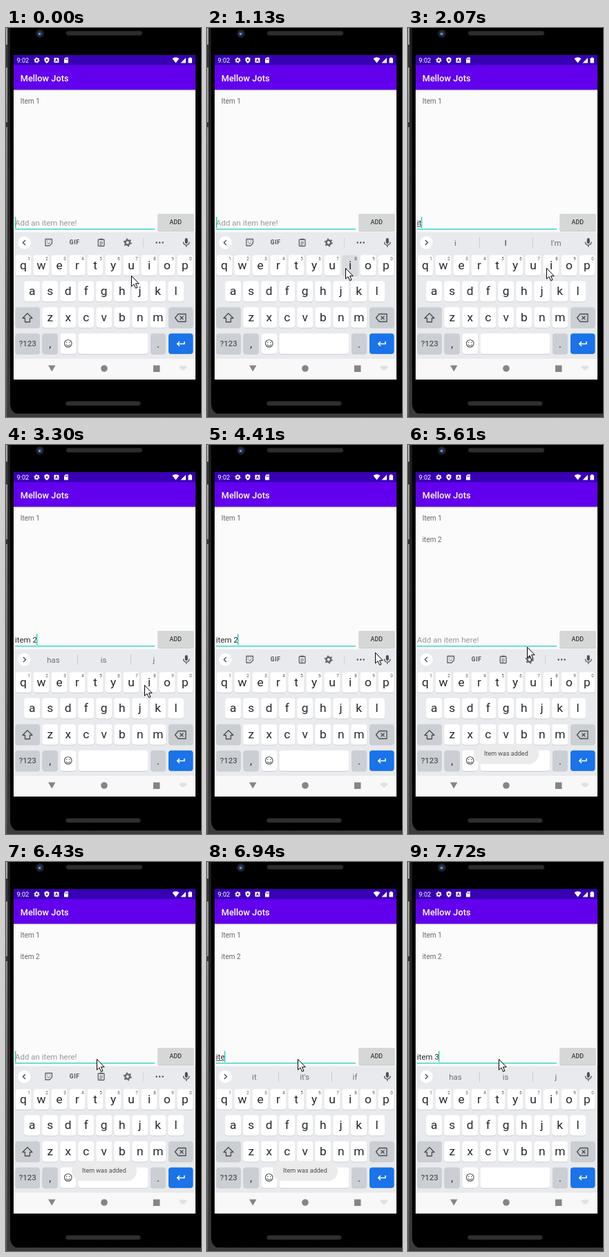
These frames come from a looping animation (282x561 px, 8 s). An HTML page:

```html
<!DOCTYPE html>
<html lang="en">
<head>
<meta charset="utf-8">
<title>Mellow Jots</title>
<style>
html, body { margin: 0; width: 100%; height: 100%; overflow: hidden; background: #000; }
svg { display: block; position: absolute; left: 0; top: 0; }
text { font-family: Roboto, "Noto Sans", sans-serif; white-space: pre; }
</style>
</head>
<body>
<svg id="stage" width="282" height="561" viewBox="0 0 282 561">
  <defs>
    <linearGradient id="wall" x2="0" y2="1">
      <stop offset="0" stop-color="#a8a8a8"/><stop offset=".26" stop-color="#8c8c8c"/><stop offset="1" stop-color="#505050"/>
    </linearGradient>
    <linearGradient id="rim" x2="0" y2="1">
      <stop offset="0" stop-color="#1c1c1c"/><stop offset="1" stop-color="#3c3c3c"/>
    </linearGradient>
  </defs>
  <rect width="282" height="561" fill="#000"/>
  <rect width="2.500" height="561" fill="url(#wall)"/>
  <path d="M2.500 0H6V543Q7 553 14 556H282V561H2.500Z" fill="url(#rim)"/>
  <path d="M0 24H2.500V57H0ZM0 136H2.500V143H0Z" fill="#333"/>
  <rect x="87" y="4.500" width="110" height="6" rx="3" fill="#2c2c2c" stroke="#1c1c1c"/>
  <rect x="86.500" y="538.500" width="108" height="6" rx="3" fill="#2f2f2f" stroke="#1e1e1e"/>
  <circle cx="49" cy="8" r="6" fill="#1b1f25"/>
  <circle cx="49" cy="8" r="3.400" fill="#26375f"/>
  <circle cx="48.500" cy="8.500" r="1.600" fill="#7e9bd2"/>

  <rect x="11" y="39" width="263" height="468" fill="#fbfbfb"/>
  <rect x="11" y="39" width="263" height="15" fill="#3700b3"/>
  <rect x="11" y="53.500" width="263" height="35.500" fill="#6200ee"/>
  <rect x="11" y="89" width="263" height="1" fill="#c9c4d2"/>
  <rect x="11" y="90" width="263" height="1" fill="#e9e8eb"/>
  <text x="15.500" y="50" font-size="9.200" fill="#fff">9:02</text>
  <g fill="#fff">
    <circle cx="44.500" cy="46.500" r="2.300" fill="none" stroke="#fff" stroke-width="1.700"/>
    <circle cx="44.500" cy="46.500" r="3.600" fill="none" stroke="#fff" stroke-width="1.200" stroke-dasharray="1.600 2.170"/>
    <path d="M59 42L62.500 43.500V46.500Q62 49.500 59 51Q56 49.500 55.500 46.500V43.500Z"/>
    <circle cx="59" cy="46.500" r="1.300" fill="#3700b3"/>
    <rect x="69.500" y="43" width="7" height="7" rx=".8"/>
    <path d="M71.300 48.700L73 44.500L74.700 48.700M72 47.300H74" stroke="#3700b3" stroke-width=".9" fill="none"/>
    <path d="M86 42.500H90V50.500H84V44.500Z"/>
    <path d="M85.800 44V46M87.300 44V46M88.800 44V46" stroke="#3700b3" stroke-width=".7"/>
    <path d="M240.500 44Q245.500 40.500 250.500 44L245.500 50.500Z"/>
    <path d="M252.500 50.500L260 43V50.500Z"/>
    <path d="M263.500 43.500H265V42.500H267.500V43.500H269V50.500H263.500Z"/>
  </g>
  <text x="20.700" y="77" font-size="12.800" font-weight="500" fill="#fff">Mellow Jots</text>
  <g font-size="10" fill="#686868">
    <text x="20.700" y="109">Item 1</text>
    <text id="added" x="20.700" y="139.500">item 2</text>
  </g>

  <text id="field" x="12.900" y="285" font-size="11.500"></text>
  <rect id="under" x="13" y="286.200" height=".8" fill="#333"/>
  <rect id="caret" y="272.500" width="1.500" height="16" fill="#2fd3c4"/>
  <rect x="13" y="289.500" width="202" height="1.300" fill="#25d0c2"/>
  <rect x="219.500" y="268.500" width="52" height="25" rx="1" fill="#c5c5c5"/>
  <rect id="add" x="219.500" y="268" width="51.500" height="24.500" rx="1" fill="#d6d7d7"/>
  <text x="245.300" y="283.300" font-size="8.900" font-weight="500" text-anchor="middle" fill="#3a3a3a">ADD</text>

  <rect x="11" y="294.500" width="263" height="183" fill="#e8eaed"/>
  <g id="keys"></g>
  <g fill="none" stroke="#4a4d51" stroke-width="1.300">
    <path d="M31 411.500L38 418.500H34.500V424H27.500V418.500H24Z" stroke-linejoin="round"/>
    <path d="M249 412.500H260V423.500H249L244.500 418Z" stroke-linejoin="round"/>
    <path d="M251.500 415.500L256.500 420.500M256.500 415.500L251.500 420.500"/>
    <circle cx="89.800" cy="455" r="5.300" stroke-width="1.100"/>
    <path d="M86.800 456.500Q89.800 460 92.800 456.500" stroke-width="1.100"/>
    <path d="M87.800 453V454.300M91.800 453V454.300"/>
    <path d="M258 452V455.500H248M251 452.300L247.700 455.500L251 458.700" stroke="#fff" stroke-width="1.500"/>
  </g>

  <circle cx="26.500" cy="309.500" r="9.300" fill="#fff"/>
  <path id="chevron" fill="none" stroke="#4a4d51" stroke-width="1.400"/>
  <g fill="#4a4d50">
    <rect x="258.800" y="303" width="4" height="8" rx="2"/>
    <path d="M256.500 308.500Q256.500 313 260.800 313Q265 313 265 308.500M260.800 313V316" fill="none" stroke="#4a4d50" stroke-width="1.200"/>
  </g>
  <g id="tools" fill="none" stroke="#5f6368" stroke-width="1.300">
    <path d="M57 304.500H66.500V310.500L63 314H57Z" stroke-linejoin="round"/>
    <path d="M59.500 309.500Q61.500 312.500 64 309.500M59.800 306.500V307.700M63.700 306.500V307.700" stroke-width="1"/>
    <text x="99.200" y="312.300" font-size="8.500" font-weight="700" text-anchor="middle" fill="#4f5357" stroke="none" letter-spacing=".6">GIF</text>
    <rect x="133.300" y="305" width="8.700" height="9.500" rx=".8"/>
    <path d="M135.500 304.800H140" stroke-width="2.200"/>
    <path d="M135.300 308.700H140M135.300 310.700H140M135.300 312.700H138.500" stroke-width=".9"/>
    <circle cx="175.800" cy="309.500" r="3.300" stroke-width="2.300"/>
    <circle cx="175.800" cy="309.500" r="5.200" stroke-width="1.600" stroke-dasharray="2.300 3.145"/>
    <path d="M198.500 303V316" stroke="#d0d3d6" stroke-width="1"/>
    <path d="M217.700 309.500H228" stroke="#4a4d50" stroke-width="2.400" stroke-linecap="round" stroke-dasharray="0 4.500"/>
  </g>
  <g id="words" font-size="11.500" text-anchor="middle" fill="#6c7075">
    <path d="M103.500 302V317M180.500 302V317" stroke="#c9ccd0"/>
    <text x="68.400" y="313.500"></text><text x="141.200" y="313.500"></text><text x="214" y="313.500"></text>
  </g>

  <g id="toast">
    <rect x="95" y="431" width="94" height="29" rx="14.500" fill="#ebebeb"/>
    <text x="110" y="448.300" font-size="9" fill="#4c4c4c">Item was added</text>
  </g>

  <rect x="11" y="477" width="263" height="30" fill="#f8f8f8"/>
  <g fill="#858585">
    <path d="M61 486.500H71.500L66.300 495.500Z"/>
    <circle cx="142" cy="491" r="4.800"/>
    <rect x="213" y="486.500" width="9.500" height="9.500"/>
    <path d="M251 488H261M251 490.200H261M253.500 492.400H258.500" stroke="#cfcfcf" stroke-width="1.200"/>
  </g>
  <path id="mouse" d="M.5 .5V15.800L4 12.600L6.600 18.300L9 17.200L6.500 11.700H11.200Z" fill="#fff" stroke="#000" stroke-width="1"/>
</svg>
<script>
const LOOP = 8000;
const $ = id => document.getElementById(id);
const NS = "http://www.w3.org/2000/svg";

function make(tag, parent, attrs, label) {
  const el = document.createElementNS(NS, tag);
  for (const k in attrs) el.setAttribute(k, attrs[k]);
  if (label) el.textContent = label;
  parent.append(el);
  return el;
}

function key(x, y, w, fill = "#fff", label = "", size = 17.4, extra = {}) {
  make("rect", $("keys"), { x, y: y + 1, width: w, height: 29.5, rx: 4, fill: "#cdd0d4" });
  const cap = make("rect", $("keys"), { x, y, width: w, height: 29.5, rx: 4, fill });
  make("text", $("keys"), {
    x: x + w / 2, y: y + 20, "font-size": size, "text-anchor": "middle", fill: "#25282b", ...extra
  }, label);
  return cap;
}

const GREY = "#cbced3", PITCH = 26;
const caps = {};
[["qwertyuiop", 13.5, 327.5], ["asdfghjkl", 26.2, 365], ["zxcvbnm", 52.3, 402.7]].forEach(([row, x0, y], r) => {
  [...row].forEach((c, i) => {
    const x = x0 + i * PITCH;
    caps[c] = key(x, y, 23, "#fff", c);
    if (r === 0) make("text", $("keys"), {
      x: x + 19.5, y: y + 7.7, "font-size": 6.4, "text-anchor": "middle", fill: "#55585c"
    }, String((i + 1) % 10));
  });
});
key(13.5, 402.7, 35.5, GREY);
key(235, 402.7, 35.5, GREY);
key(13.5, 440.5, 35.5, GREY, "?123", 11.5, { y: 459.3, "font-weight": 500, fill: "#55585d" });
key(52.5, 440.5, 22.5, GREY, ",", 15);
key(78.5, 440.5, 23);
key(104.5, 440.5, 101);
key(209, 440.5, 22, GREY, ".", 15);
key(235, 440.5, 35.5, "#1a73e8");

// Each row: time, then the state it changes.
const I = ["i", "I", "I'm"], IT = ["it", "it's", "if"],
  ITE = ["item", "items", "it"], ITEM = ["item", "items", "item's"], NEXT = ["has", "is", "j"];
const steps = [
  [0, { text: "", mark: 0, caret: 1, words: null, added: 0, toast: 0, press: 0, hit: 0, x: 181, y: 357 }],
  [150, { x: 184, y: 355 }],
  [290, { x: 193, y: 350 }],
  [430, { x: 199, y: 347 }],
  [570, { x: 200, y: 346, caret: 0 }],
  [1130, { hit: 1, caret: 1 }],
  [1280, { hit: 0, text: "i", mark: 1, words: I }],
  [1680, { caret: 0 }],
  [2070, { text: "it", caret: 1 }],
  [2330, { words: IT }],
  [2450, { text: "ite" }],
  [2760, { text: "item", words: ITE }],
  [3010, { words: ITEM }],
  [3300, { text: "item 2", mark: 0, words: NEXT }],
  [3720, { x: 206, y: 334 }],
  [3840, { x: 229, y: 288, caret: 0 }],
  [3960, { x: 258, y: 232, words: null }],
  [4080, { x: 270, y: 205 }],
  [4240, { x: 262, y: 255 }],
  [4410, { x: 243, y: 299, caret: 1 }],
  [4530, { x: 243, y: 287 }],
  [4680, { x: 243, y: 280 }],
  [4810, { press: 1 }],
  [4930, { text: "", added: 1, toast: .6 }],
  [5060, { press: 0, toast: 1 }],
  [5220, { caret: 0 }],
  [5350, { x: 235, y: 282 }],
  [5490, { x: 206, y: 288 }],
  [5610, { x: 172, y: 291 }],
  [5730, { x: 144, y: 289, caret: 1 }],
  [5880, { x: 134, y: 285 }],
  [6030, { x: 131, y: 284, caret: 0 }],
  [6430, { caret: 1 }],
  [6700, { text: "i", mark: 1 }],
  [6820, { text: "it", words: I }],
  [6940, { text: "ite", words: IT }],
  [7180, { text: "item", words: ITE }],
  [7300, { words: ITEM }],
  [7420, { text: "item ", mark: 0, toast: .5 }],
  [7580, { words: NEXT, toast: 0 }],
  [7720, { text: "item 3" }]
];

const show = (el, v) => el.setAttribute("opacity", +v);
const slots = $("words").querySelectorAll("text");

// Glyph advances at the field's font size.
const advance = { i: 2.8, t: 3.75, e: 6.1, m: 10.1, " ": 2.85 };
const widthOf = s => [...s].reduce((w, c) => w + (advance[c] || 6.45), 0);

function draw(t) {
  const s = {};
  for (const [at, change] of steps) if (at <= t) Object.assign(s, change);
  const field = $("field"), w = widthOf(s.text);
  field.textContent = s.text || "Add an item here!";
  field.setAttribute("fill", s.text ? "#2c2c2c" : "#999");
  $("under").setAttribute("width", s.mark ? w : 0);
  $("caret").setAttribute("x", Math.floor(13 + w * .98));
  show($("caret"), s.caret);
  show($("added"), s.added);
  show($("toast"), s.toast);
  show($("tools"), !s.words);
  show($("words"), !!s.words);
  slots.forEach((el, i) => {
    el.textContent = s.words ? s.words[i] : "";
    el.setAttribute("font-weight", s.words === I && i === 1 ? 700 : 400);
  });
  $("chevron").setAttribute("d", s.words ? "M25 306L28.5 309.5L25 313" : "M28 306L24.5 309.5L28 313");
  $("add").setAttribute("fill", s.press ? "#bfc0c0" : "#d6d7d7");
  caps.i.setAttribute("fill", s.hit ? "#d9dbde" : "#fff");
  $("mouse").setAttribute("transform", `translate(${s.x} ${s.y})`);
}

const start = performance.now();
function tick() {
  draw((performance.now() - start) % LOOP);
  requestAnimationFrame(tick);
}
tick();
</script>
</body>
</html>
```
